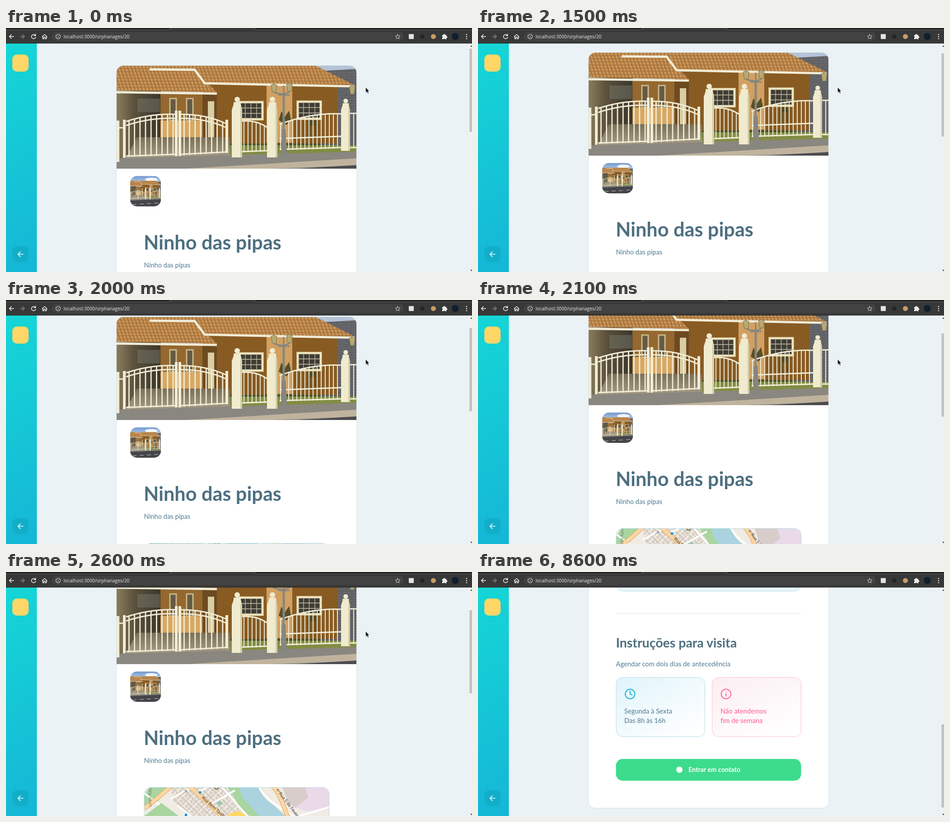
Animation, 1032 px wide and 543 px high, one loop 8700 ms. Source, as an HTML page:

```html
<!DOCTYPE html>
<html lang="pt">
<head>
<meta charset="utf-8">
<title>Visita</title>
<style>
html, body { margin: 0; width: 100%; height: 100%; overflow: hidden; background: #ebf2f5 }
svg { display: block; width: 100%; height: 100% }
text { font: 500 14.7px Lato, "Open Sans", sans-serif; fill: #5c8599 }
.h { font-weight: 700; fill: #4d6f80 }
.warn { fill: #ff669d }
.line { fill: none; stroke-linecap: round; stroke-linejoin: round }
.cream { fill: none; stroke: #f1ecd6 }
.edge { fill: none; stroke: #dba35c; stroke-width: 10 }
.road { fill: none; stroke: #fcd6a4; stroke-width: 8 }
.lane { fill: none; stroke: #fff; stroke-width: 4 }
.street { font: 9.5px "Noto Sans", sans-serif; fill: #333 }
</style>
</head>
<body>
<svg viewBox="0 0 1032 543">
<defs>
  <linearGradient id="teal" gradientUnits="userSpaceOnUse" x1="155" y1="493" x2="-86" y2="84">
    <stop stop-color="#15b6d6"/><stop offset="1" stop-color="#15d6d6"/>
  </linearGradient>
  <linearGradient id="blue" gradientUnits="userSpaceOnUse" x1="351" y1="208" x2="458" y2="393">
    <stop offset=".08" stop-color="#e3f5fb"/><stop offset=".93" stop-color="#fff"/>
  </linearGradient>
  <linearGradient id="pink" gradientUnits="userSpaceOnUse" x1="569" y1="204" x2="664" y2="397">
    <stop offset=".08" stop-color="#fbeff2"/><stop offset=".91" stop-color="#fff"/>
  </linearGradient>
  <linearGradient id="garage">
    <stop stop-color="#8a7c5c"/><stop offset=".4" stop-color="#5b503c"/><stop offset="1" stop-color="#3a362d"/>
  </linearGradient>
  <linearGradient id="floor" x2="0" y2="1">
    <stop stop-color="#7a7059"/><stop offset="1" stop-color="#a89d84"/>
  </linearGradient>
  <linearGradient id="sky" x2="0" y2="1">
    <stop stop-color="#6f97cf"/><stop offset="1" stop-color="#e6edf5"/>
  </linearGradient>
  <pattern id="tiles" width="8" height="7" patternUnits="userSpaceOnUse" patternTransform="skewX(18)">
    <path fill="#c08b4f" d="M0 0h8v7H0z"/><path fill="#a57139" d="M0 0h2v7H0zM0 6h8v1H0z"/><path fill="#d0a066" d="M4 1h2v4H4z"/>
  </pattern>
  <pattern id="bars" width="12.2" height="300" patternUnits="userSpaceOnUse" x="271">
    <path fill="#f1ecd6" d="M0 0h2.800v300H0z"/>
  </pattern>
  <pattern id="thin" width="9" height="300" patternUnits="userSpaceOnUse" x="526">
    <path fill="#efead4" d="M0 0h2v300H0z"/>
  </pattern>
  <pattern id="stone" width="22" height="12" patternUnits="userSpaceOnUse">
    <path fill="#66676a" d="M0 0h22v12H0z"/><path fill="none" stroke="#55575b" d="M0 .5h22M0 6.500h22M6 0v6M16 6v6"/>
  </pattern>
  <pattern id="lots" width="17" height="15" patternUnits="userSpaceOnUse" patternTransform="rotate(45)">
    <path fill="#d9cfc5" stroke="#c3b5a8" stroke-width=".7" d="M1 2h7v4H1zM10 1h5v6h-5zM3 9h5v4H3zM11 10h4v3h-4z"/>
  </pattern>
  <clipPath id="top"><path d="M245 313V99a15 15 0 0 1 15-15H761a15 15 0 0 1 15 15V313z"/></clipPath>
  <clipPath id="round"><rect x="275" y="329.5" width="68" height="67.5" rx="15"/></clipPath>
  <clipPath id="frame"><rect x="306" y="479.5" width="409.5" height="267" rx="15"/></clipPath>

  <g id="pane">
    <path fill="#3f3c35" stroke="#eee5bf" stroke-width="5" d="M0 0h51v38H0z"/>
    <path stroke="#c9c3ab" stroke-width="1.3" d="M13 0v38M25.5 0v38M38 0v38M0 13h51M0 25h51"/>
  </g>
  <g id="pillar">
    <circle cx="12" cy="5" r="6"/><path d="M4 11h16v5l3 12v106H0V28l4-12z"/>
    <path fill="#d2cca9" d="M20 16l3 12v106h-4V28z"/>
  </g>
  <path id="lantern" fill="#b7a870" stroke="#73705f" d="M0 3l6-3 7 3-2 16H3z"/>

  <g id="house" clip-path="url(#top)">
    <path fill="#b4c3d8" d="M245 84h532v60H245z"/>
    <path fill="#4c542d" d="M435 240h342v25H435z"/>
    <path fill="#818d43" d="M490 261h287v28H490z"/>
    <path fill="url(#stone)" d="M690 96l87-5v170h-80z"/>
    <path fill="#885b23" d="M435 115h300v142H435z"/>
    <path fill="#d2a061" d="M577 127h57v128h-57z"/>
    <path fill="url(#garage)" d="M245 140h98v165h-98z"/>
    <path fill="#77796b" d="M291 157h50v30h-50z" opacity=".5"/>
    <path fill="#94682f" d="M342 145h93v65h-93z"/>
    <path fill="#d8a862" d="M342 206h93v40h-93z"/>
    <path fill="#6e4a20" d="M435 145h32v115h-32z"/>
    <path fill="#d9cda2" d="M447 163h14v92h-14z"/>
    <path fill="#665a45" stroke="#c9b88b" stroke-width="3" d="M363 157h14v49h-14zM400 157h14v49h-14z"/>
    <path fill="url(#tiles)" d="M245 84h75l98 9 49 50-222-4zM318 84h368l86 43-332-5-22-32H318z"/>
    <path class="cream" stroke-width="5" d="M245 143l222 3M318 92l100 1 22 30 332 7"/>
    <path fill="url(#floor)" d="M290 243h206v48H265z"/>
    <path fill="#8a8780" d="M245 290l532-15v38H245z"/>
    <path fill="#c0b39d" d="M400 313l377-23v16l-190 7z"/>
    <path fill="#4c4c50" d="M645 313l132-8v8z"/>
    <use href="#pane" x="517" y="165"/><use href="#pane" x="646" y="164"/>
    <path fill="#574f28" d="M604 205l6-20 7 13 10-14 4 20-10 12zM668 205h22v42h-6v-30h-10v30h-6z"/>
    <path fill="url(#bars)" d="M266 208Q320 190 376 192V283l-110 4zM388 192q54 0 98 20v66l-98 6z"/>
    <path fill="url(#thin)" d="M523 207q32-2 55 14v54l-55 2zM606 214q70-26 136-23v77l-136 4zM762 190h15v78h-15z"/>
    <g class="cream" stroke-width="3">
      <path d="M266 208Q320 190 376 192M388 192q54 0 98 20M266 217Q320 199 376 201M388 201q54 0 98 20M266 285l110-4M388 281l98-5"/>
      <path d="M523 207q32-2 55 14M523 275l55-2M606 214q70-26 136-23M606 270l136-4M606 246l136-5M762 190h15M762 266h15M245 222h14"/>
      <path stroke-width="6" d="M248 206v92M262 204v85M377 184v101M385 184v101M489 204v74"/>
    </g>
    <g fill="#f0ebcf">
      <use href="#pillar" x="500" y="154"/><use href="#pillar" x="578" y="154"/>
      <use href="#pillar" transform="translate(742 158) scale(.86)"/>
    </g>
    <path fill="none" stroke="#85867f" stroke-width="5" d="M615 146v144"/>
    <path fill="none" stroke="#85867f" stroke-width="3" d="M594 143q20 8 34-1M603 149h25M615 128v20"/>
    <path fill="#85867f" d="M611 225h8l4 68h-14z"/>
    <use href="#lantern" x="587" y="124"/><use href="#lantern" x="621" y="122"/><use href="#lantern" x="760" y="128"/>
  </g>
</defs>

<rect width="1032" height="543" fill="#ebf2f5"/>
<g id="page">
  <rect x="244.5" y="83.5" width="532.5" height="1254" rx="15" fill="#fff" stroke="#d3e2e5"/>
  <use href="#house"/>
  <g clip-path="url(#round)">
    <path fill="url(#sky)" d="M275 329h68v25h-68z"/>
    <ellipse cx="322" cy="337" rx="14" ry="4" fill="#f2f5f9"/>
    <use href="#house" transform="translate(243.6 323.2) scale(.128 .2)"/>
    <path fill="#45464a" d="M275 384l68-3v17h-68z"/>
    <path stroke="#c9c9c4" stroke-dasharray="9 7" d="M280 393l63-4"/>
  </g>
  <text class="h" x="305" y="493" style="font-size:43.2px">Ninho das pipas</text>
  <text x="305.5" y="532.5">Ninho das pipas</text>

  <g transform="translate(0 108)">
    <g clip-path="url(#frame)">
      <path fill="#f0ece4" d="M306 479h410v268H306z"/>
      <path fill="url(#lots)" d="M365 479h120l70 68H410l-40-38z"/>
      <path fill="#a9d5a0" d="M318 479h42l-26 34-28 6v-24zM306 543l38-29 44 33v60h-82zM490 479h28l82 80h-42l-40-36z"/>
      <path fill="#aad3df" d="M518 479h41q10 26 34 40l48 45h-62q-28-32-44-49-16-14-17-36z"/>
      <path fill="#d9cdcc" d="M612 479h51l7 22-28 24-18-12z"/>
      <path fill="#ead9e8" d="M663 479h53v48l-50 6-24-9 28-23z"/>
      <path fill="#8fcbb3" d="M466 514l8-5 6 6-8 5z"/>
      <path class="lane" d="M365 505l45-26M380 520l35 27M425 491l20-12M447 520l60-34M478 479l60 68M560 479q20 35 85 68M650 543l66-20M306 492l34 26"/>
      <path id="main" class="edge" d="M306 527l34-28 27-24M402 473l82 76M588 473q14 16 22 35l16 42"/>
      <path class="road" d="M306 527l34-28 27-24M402 473l82 76M588 473q14 16 22 35l16 42"/>
      <path fill="#0092da" d="M427 488h5v5h-5zM396 538h5v5h-5z"/>
      <path class="line" stroke="#555" d="M393 492l7-6m-4 0h4v4M608 490l-7-6m4 0h-4v4"/>
      <circle cx="466" cy="479" r="4.5" fill="none" stroke="#7a5a2c" stroke-width="2"/>
      <text class="street" transform="translate(433 503) rotate(43)">Rua Bem Tardio</text>
      <text class="street" transform="translate(604 493) rotate(53)">Rua 5 de Fevereiro</text>
      <text class="street" transform="translate(322 523) rotate(-90)" style="fill:#777">umbi Rala</text>
      <circle cx="511" cy="559" r="26" fill="#ffd666"/>
      <path fill="#e6f7fb" d="M306 709h410v40H306z"/>
    </g>
    <rect x="306" y="479.5" width="409.5" height="267" rx="15" fill="none" stroke="#b3dae2"/>
  </g>

  <g transform="translate(0 812)">
    <path stroke="#d3e2e6" d="M305.5 92h410"/>
    <text class="h" x="305.5" y="168" style="font-size:28.5px">Instruções para visita</text>
    <text x="305.5" y="210">Agendar com dois dias de antecedência</text>
    <rect x="306" y="234.5" width="196.5" height="132" rx="15" fill="url(#blue)" stroke="#b3dae2"/>
    <rect x="518.5" y="234.5" width="197" height="132" rx="15" fill="url(#pink)" stroke="#ffbcd4"/>
    <g class="line" stroke-width="2">
      <g stroke="#15b6d6"><circle cx="336.8" cy="271.5" r="10.7"/><path d="M336.8 265v6.500l4.300 2.200"/></g>
      <g stroke="#ff669d"><circle cx="549.3" cy="271.5" r="10.7"/><path d="M549.3 271v5M549.3 267v.01"/></g>
    </g>
    <text x="324" y="314.5">Segunda à Sexta</text>
    <text x="324" y="336">Das 8h às 16h</text>
    <text class="warn" x="537" y="314.5">Não atendemos</text>
    <text class="warn" x="537" y="336">fim de semana</text>
    <rect x="305.5" y="416" width="410" height="48.5" rx="15" fill="#3cdc8c"/>
    <circle cx="446" cy="440" r="7" fill="#fff"/>
    <text x="466" y="445" style="font-weight:700;font-size:14.4px;fill:#fff">Entrar em contato</text>
  </g>
</g>

<path fill="url(#teal)" d="M0 34h68.400v509H0z"/>
<rect x="14" y="59" width="36" height="38" rx="10" fill="#ffd666"/>
<rect x="14" y="485" width="36" height="36.5" rx="12" fill="#12afcb"/>
<path class="line" stroke="#fff" stroke-width="1.5" d="M38 503.5H26.500m5.500-5.500l-5.500 5.500 5.500 5.500"/>

<path fill="#f1f1f1" d="M1026 34h6v509h-6z"/>
<rect id="thumb" x="1026.5" y="46" width="5.5" height="185" fill="#c1c1c1"/>
<path fill="#505050" d="M1028 42l4-4v4zM1028 538h4v4z"/>

<path fill="#383838" d="M0 0h1032v34H0z"/>
<path fill="#555" d="M0 3.5h361l4-3.500h2l-5 5H0zM547 0h2l4 3.500h479V5H552z"/>
<path fill="#262626" d="M0 0h364l-3 3.500H0zM550 0h482v3.500H553zM0 33.500h1032v1H0z"/>
<rect x="102" y="9" width="779" height="20.5" rx="10.25" fill="#424242"/>
<g class="line" stroke="#f2f2f2" stroke-width="1.5">
  <path d="M17 19H7.500m4.500-4.500L7.500 19l4.500 4.500"/>
  <path stroke="#858585" d="M31.500 19H41m-4.500-4.500L41 19l-4.500 4.500"/>
  <path d="M65 16.500a4.700 4.700 0 1 0 .6 4M65.500 13.500v3.500H62"/>
  <path d="M80 19.500l5.500-5 5.500 5M81.500 19v5h2.500v-3.500h3V24h2.500v-5"/>
  <g stroke="#d5d5d5" stroke-width="1.2">
    <circle cx="115.5" cy="19" r="5"/><path d="M115.500 18.500v3M115.500 16.300v.01"/>
    <path stroke-width="1" d="M867.500 14l1.500 3.500 3.700.3-2.800 2.500.9 3.700-3.300-2-3.300 2 .9-3.700-2.800-2.500 3.700-.3z"/>
  </g>
</g>
<text x="127.5" y="22.8" style="font:10.3px 'Open Sans','Noto Sans',sans-serif;fill:#ededed">localhost:3000/orphanages/20</text>
<rect x="892" y="13.5" width="11" height="11" fill="#e4e4e4"/>
<circle cx="922" cy="19" r="4.5" fill="#242424"/>
<circle cx="946.5" cy="19" r="5.5" fill="#c79a68"/>
<path fill="#eee" d="M966 15.500h3.200a1.700 1.700 0 1 1 3.200 0h3v3.200a1.700 1.700 0 1 1 0 3.200v3H972a1.600 1.600 0 0 0-3 0h-3v-3.200a1.600 1.600 0 0 0 0-3z"/>
<circle cx="995" cy="19" r="8" fill="#10202f"/>
<g fill="#eee"><circle cx="1020" cy="14.5" r="1.3"/><circle cx="1020" cy="19" r="1.3"/><circle cx="1020" cy="23.5" r="1.3"/></g>

<path id="arrow" fill="#111" stroke="#fff" stroke-width=".6" d="M0 0v12l2.700-2.500 2 4.500 2-.9-2-4.300h3.500z"/>
<path id="beam" class="line" stroke="#111" stroke-width="1.3" d="M317.500 7.500q2.500 0 2.500 2v8q0 2-2.500 2M322.500 7.500q-2.500 0-2.500 2v8q0 2 2.500 2"/>
</svg>
<script>
const LOOP = 8700;
const $ = id => document.getElementById(id);
const scrolls = [[0, 0], [1400, 5], [1500, 29], [1600, 40.5], [2000, 46], [2100, 79],
  [2200, 81], [2500, 86], [2600, 108], [7300, 812]];
const pointer = [[0, "796.5 132"], [7300, "789.5 126.5"], [7700, "788.5 125"], [8100, ""]];
const at = (list, t) => list.findLast(step => step[0] <= t)[1];
const show = (el, on) => el.setAttribute("visibility", on ? "visible" : "hidden");

function draw() {
  const t = performance.now() % LOOP;
  const y = at(scrolls, t), tip = at(pointer, t);
  $("page").setAttribute("transform", `translate(0 ${-y})`);
  $("thumb").setAttribute("y", 46 + y * 0.361);
  show($("arrow"), tip);
  if (tip) $("arrow").setAttribute("transform", `translate(${tip})`);
  show($("beam"), t >= 8100 && t < 8600);
  requestAnimationFrame(draw);
}
draw();
</script>
</body>
</html>
```
